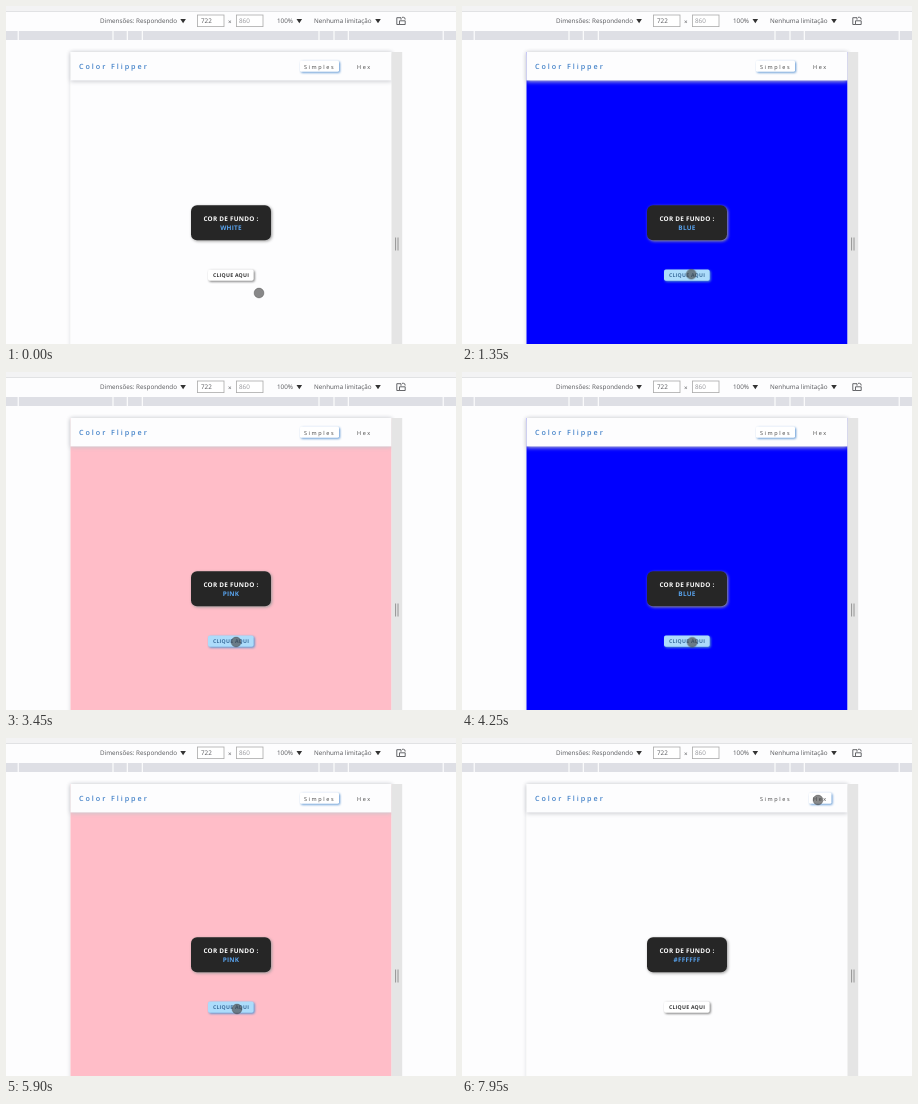
These frames come from a looping animation (450 px wide and 338 px high, 8 s). An HTML page:

```html
<!DOCTYPE html>
<html lang="pt-BR">
<head>
<meta charset="utf-8">
<title>Color Flipper</title>
<style>
  html, body { margin: 0; width: 100%; height: 100%; overflow: hidden; background: #fdfdfe; }
  svg { display: block; width: 100%; height: 100%; }
  text { font-family: "Open Sans", "Noto Sans", sans-serif; text-rendering: geometricPrecision; }
  .tool text { font-size: 6.3px; fill: #55565a; }
  .tool .field { fill: #fff; stroke: #aaa; stroke-width: .8; }
  .brand { font-size: 7.2px; font-weight: 600; letter-spacing: 1.95px; fill: #4382c8; }
  .nav text { font-size: 5.5px; letter-spacing: 1.6px; fill: #444; }
  .nav rect { fill: #fff; visibility: hidden; filter: drop-shadow(1.2px 1.2px 1px #5e96d3); }
  .nav .on rect { visibility: visible; }
  .header { fill: #fdfdfe; filter: drop-shadow(0 1.5px 2px #c6c8cd); }
  .card rect { fill: #262626; filter: drop-shadow(1px 1px 1.5px #999); }
  .card text { font-size: 6.4px; font-weight: 700; letter-spacing: .25px; text-anchor: middle; fill: #fff; }
  .card .value { fill: #58a2ec; }
  .button rect { fill: #fff; filter: drop-shadow(1px 1px 1px #777); }
  .button text { font-size: 5.2px; font-weight: 700; letter-spacing: .25px; text-anchor: middle; fill: #333; }
  .button.on rect { fill: #addcfb; filter: drop-shadow(1px 1px 1px #4c8fce); }
  .button.on text { fill: #3b6d9c; }

  .cursor {
    fill: rgba(65, 65, 65, .62); stroke: rgba(65, 65, 65, .45); stroke-width: .8;
    animation: glide 8s linear infinite;
  }
  @keyframes glide {
    0%, 1% { transform: translate(253px, 287px); animation-timing-function: ease-in-out; }
    7% { transform: translate(229px, 268px); }
    17% { transform: translate(229.3px, 268.2px); }
    30% { transform: translate(230px, 269.5px); }
    62% { transform: translate(230.3px, 270.7px); }
    74%, 86% { transform: translate(231px, 271px); animation-timing-function: ease-in-out; }
    94%, 100% { transform: translate(356px, 62px); }
  }
</style>
</head>
<body>
<svg viewBox="0 0 450 338">
  <rect width="450" height="338" fill="#fdfdfe"/>

  <g class="tool">
    <rect width="450" height="5.5" fill="#f3f3f4"/>
    <path d="M0 5.5H450" stroke="#dcdde0" stroke-width=".8"/>
    <text x="94" y="17.4">Dimensões: Respondendo</text>
    <rect class="field" x="191.5" y="9" width="26.5" height="11.6"/>
    <text x="195" y="17.4">722</text>
    <text x="222" y="18">×</text>
    <rect class="field" x="230.5" y="9" width="26.5" height="11.6"/>
    <text x="233" y="17.4" style="fill:#96979b">860</text>
    <text x="271" y="17.4">100%</text>
    <text x="308" y="17.4">Nenhuma limitação</text>
    <path d="M174.3 13h5.6l-2.8 4.2zM290.5 13h5.6l-2.8 4.2zM369.2 13h5.6l-2.8 4.2z" fill="#333"/>
    <path d="M393.5 18.5h-2.7v-6.8h4.2v2M393.5 18.5v-3.7h5.7v3.7zM396 11.3h1.5q1.7 0 1.7 2.2" fill="none" stroke="#55565a" stroke-width=".9"/>
    <rect y="25" width="450" height="9" fill="#dedfe5"/>
    <path d="M12.2 25v9M107 25v9M121.3 25v9M136.3 25v9M313 25v9M328 25v9M342.3 25v9M437.2 25v9" stroke="#fff" stroke-width="1.1"/>
  </g>

  <rect x="64.5" y="46" width="321" height="300" fill="#fdfdfe" style="filter:drop-shadow(0 0 2px #d9dade)"/>
  <rect id="page" x="64.5" y="46" width="321" height="292"/>
  <rect class="header" x="64.5" y="46" width="321" height="28.4"/>
  <text class="brand" x="73" y="63">Color Flipper</text>
  <g class="nav">
    <g id="simple"><rect x="294" y="54.5" width="39" height="11.3" rx="1.5"/><text x="298" y="62.5">Simples</text></g>
    <g id="hex"><rect x="347" y="54.5" width="22.5" height="11.3" rx="1.5"/><text x="351" y="62.5">Hex</text></g>
  </g>

  <g class="card">
    <rect x="185" y="199.3" width="80" height="35" rx="6"/>
    <text x="225" y="215.1">COR DE FUNDO :</text>
    <text id="value" class="value" x="225" y="223.6">WHITE</text>
  </g>
  <g id="button" class="button">
    <rect x="202" y="263.6" width="45.7" height="11.2" rx="1.8"/>
    <text x="225" y="271.2">CLIQUE AQUI</text>
  </g>

  <rect x="385.6" y="46" width="10.6" height="292" fill="#e5e5e5"/>
  <path d="M389.6 231.5v13M392 231.5v13" stroke="#8b8b8b" stroke-width=".9"/>
  <circle id="cursor" class="cursor" r="4.9"/>
</svg>
<script>
  const el = id => document.getElementById(id);
  const fills = { WHITE: '#fdfdfe', '#FFFFFF': '#fdfdfe', BLUE: '#0000ff', PINK: '#ffbdc8', RED: '#ff0000' };
  const clicks = [
    [0, 'WHITE'], [700, 'PINK'], [1200, 'BLUE'], [1750, 'RED'], [2200, 'BLUE'],
    [2950, 'PINK'], [3900, 'BLUE'], [4600, 'RED'], [5450, 'PINK'], [7750, '#FFFFFF']
  ];
  const glide = el('cursor').getAnimations()[0];

  function draw() {
    const t = (glide.currentTime || 0) % 8000;
    const [, name] = clicks.filter(([start]) => start <= t).pop();
    el('page').setAttribute('fill', fills[name]);
    el('value').textContent = name;
    el('simple').classList.toggle('on', t < 7750);
    el('hex').classList.toggle('on', t >= 7420);
    el('button').classList.toggle('on', t >= 400 && t < 7040);
    requestAnimationFrame(draw);
  }
  draw();
</script>
</body>
</html>
```
